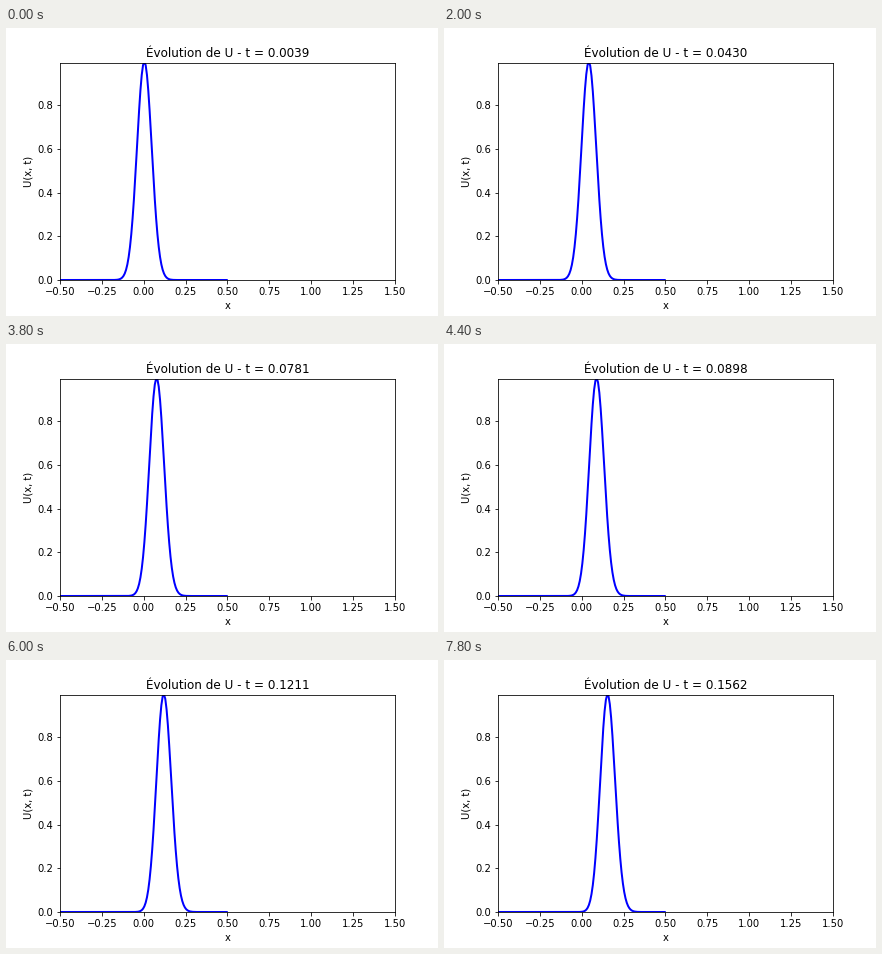
These frames come from a looping animation (432x288 px, 8000 ms). A matplotlib script:

```python
import numpy as np
import matplotlib.pyplot as plt
from matplotlib.animation import FuncAnimation

CELLS = 128
FRAMES = 40
CFL = 0.5
SHARPNESS = 256

dx = 1 / CELLS
dt = CFL * dx
x = -0.5 + dx * (np.arange(CELLS) + 0.5)


def advect(u):
    """One Lax-Wendroff step at unit speed on a periodic grid."""
    left, right = np.roll(u, 1), np.roll(u, -1)
    return u - CFL / 2 * (right - left) + CFL**2 / 2 * (right - 2 * u + left)


states = [np.exp(-SHARPNESS * x**2)]
for _ in range(FRAMES):
    states.append(advect(states[-1]))

plt.rcParams.update({"font.family": "DejaVu Sans", "font.size": 10})
fig, ax = plt.subplots(figsize=(6, 4), dpi=72)
fig.subplots_adjust(left=0.125, right=0.9, bottom=0.125, top=0.88)
ax.set_xlim(-0.5, 1.5)
ax.set_ylim(0, states[0].max())
ax.set_xlabel("x")
ax.set_ylabel("U(x, t)")
title = ax.set_title("")
line, = ax.plot(x, states[0], color="blue", lw=2)


def update(frame):
    step = frame + 1
    line.set_ydata(states[step])
    title.set_text(f"Évolution de U - t = {step * dt:.4f}")
    return line, title


anim = FuncAnimation(fig, update, frames=FRAMES, interval=200,
                     repeat=True, repeat_delay=0)
plt.show()
```
